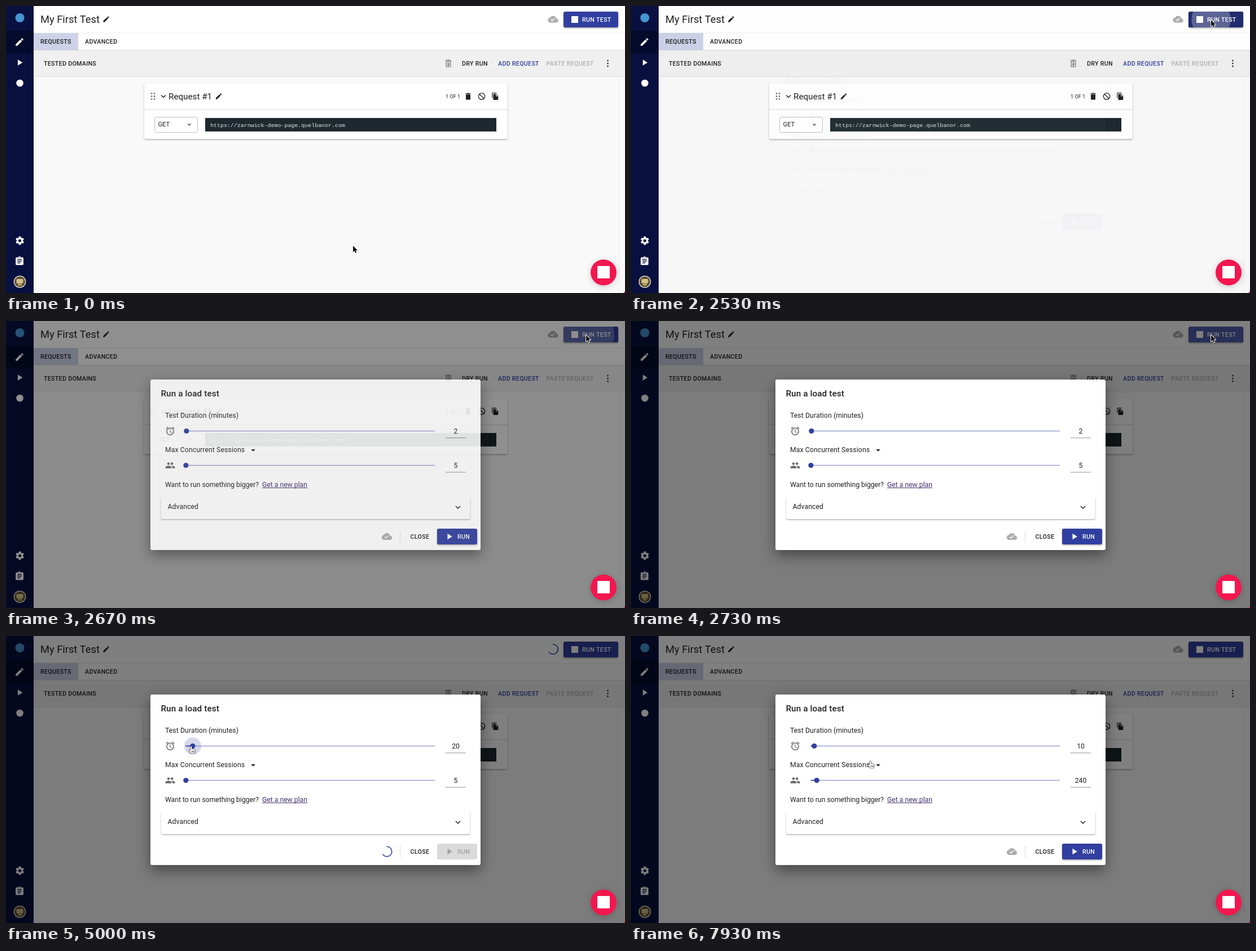
An HTML page with a canvas for the animation above (8 s loop, 1097 by 510 pixels).

```html
<!DOCTYPE html>
<html lang="en">
<head>
<meta charset="utf-8">
<title>Run a load test</title>
<style>
  html, body { margin: 0; width: 100%; height: 100%; overflow: hidden; background: #fafafa; }
  canvas { display: block; width: 100%; height: 100%; }
</style>
</head>
<body>
<canvas id="stage"></canvas>
<script>
const W = 1097, H = 510, LOOP = 8000;
const INK = "#1f1f1f", BLUE = "#303f9f", BLUE_DARK = "#212c6f", SIDE = "#08103f";
const dpr = window.devicePixelRatio || 1;

function makeLayer(canvas) {
  canvas.width = Math.round(W * dpr);
  canvas.height = Math.round(H * dpr);
  const ctx = canvas.getContext("2d");
  ctx.scale(dpr, dpr);
  return ctx;
}
const stage = makeLayer(document.getElementById("stage"));
const sheet = makeLayer(document.createElement("canvas"));
let g = stage; // the context the helpers draw on

const icons = {
  edit: "M3 17.25V21h3.75L17.81 9.94l-3.75-3.75L3 17.25zM20.71 7.04c.39-.39.39-1.02 0-1.41l-2.34-2.34c-.39-.39-1.02-.39-1.41 0l-1.83 1.83 3.75 3.75 1.83-1.83z",
  play: "M8 5v14l11-7z",
  cloud: "M19.35 10.04C18.67 6.59 15.64 4 12 4 9.11 4 6.6 5.64 5.35 8.04 2.34 8.36 0 10.91 0 14c0 3.31 2.69 6 6 6h13c2.76 0 5-2.24 5-5 0-2.64-2.05-4.78-4.65-4.96zM10 17l-3.5-3.5 1.41-1.41L10 14.17 15.18 9l1.41 1.41L10 17z",
  bin: "M6 19c0 1.1.9 2 2 2h8c1.1 0 2-.9 2-2V7H6v12zM19 4h-3.5l-1-1h-5l-1 1H5v2h14V4z",
  restore: "M6 19c0 1.1.9 2 2 2h8c1.1 0 2-.9 2-2V7H6v12zm2-5V9h8v10H8v-5zm2 4h4v-4h2l-4-4-4 4h2zM15.5 4l-1-1h-5l-1 1H5v2h14V4z",
  copy: "M16 1H4c-1.1 0-2 .9-2 2v14h2V3h12V1zm-1 4l6 6v10c0 1.1-.9 2-2 2H7.99C6.89 23 6 22.1 6 21l.01-14c0-1.1.89-2 1.99-2h7zm-1 7h5.5L14 6.5V12z",
  list: "M19 3h-4.18C14.4 1.84 13.3 1 12 1c-1.3 0-2.4.84-2.82 2H5c-1.1 0-2 .9-2 2v14c0 1.1.9 2 2 2h14c1.1 0 2-.9 2-2V5c0-1.1-.9-2-2-2zm-7 0c.55 0 1 .45 1 1s-.45 1-1 1-1-.45-1-1 .45-1 1-1zm2 14H7v-2h7v2zm3-4H7v-2h10v2zm0-4H7V7h10v2z",
  more: "M16.59 8.59L12 13.17 7.41 8.59 6 10l6 6 6-6z",
  drop: "M7 10l5 5 5-5z",
  alarm: "M22 5.72l-4.6-3.86-1.29 1.53 4.6 3.86L22 5.72zM7.88 3.39L6.6 1.86 2 5.71l1.29 1.53 4.59-3.85zM12.5 8H11v6l4.75 2.85.75-1.23-4-2.37V8zM12 4c-4.97 0-9 4.03-9 9s4.02 9 9 9c4.97 0 9-4.03 9-9s-4.03-9-9-9zm0 16c-3.87 0-7-3.13-7-7s3.13-7 7-7 7 3.13 7 7-3.13 7-7 7z",
  people: "M16 11c1.66 0 2.99-1.34 2.99-3S17.66 5 16 5c-1.66 0-3 1.34-3 3s1.34 3 3 3zm-8 0c1.66 0 2.99-1.34 2.99-3S9.66 5 8 5C6.34 5 5 6.34 5 8s1.34 3 3 3zm0 2c-2.33 0-7 1.17-7 3.5V19h14v-2.5c0-2.33-4.67-3.5-7-3.5zm8 0c-.29 0-.62.02-.97.05 1.16.84 1.97 1.97 1.97 3.45V19h6v-2.5c0-2.33-4.67-3.5-7-3.5z",
  arrow: "M0 0V11.5L2.7 9 4.4 13 6.3 12.2 4.6 8.3H8.2z",
  hand: "M-1.2 1.2a1.2 1.2 0 0 1 2.4 0V5q1.2-.9 2 .3 1.2-.6 1.9 .5 1.6-.4 1.9 1V9.3L6 12.8H0L-3.2 8.6q-1.4-2 0-2.3 .9-.2 2 1.5z"
};
for (const name in icons) icons[name] = new Path2D(icons[name]);

// Timing helpers
const clamp = v => Math.max(0, Math.min(1, v));
const smooth = p => (p = clamp(p), p * p * (3 - 2 * p));
const mix = (a, b, p) => a + (b - a) * p;
const between = (t, a, b) => t >= a && t < b;
const ramp = (t, start, length) => smooth((t - start) / length);

function track(keys, t) {
  let i = 0;
  while (i < keys.length - 1 && t >= keys[i + 1][0]) i++;
  const [t0, ...a] = keys[i];
  if (t < t0 || i === keys.length - 1) return a;
  const [t1, ...b] = keys[i + 1];
  const p = smooth((t - t0) / (t1 - t0));
  return a.map((v, k) => mix(v, b[k], p));
}

const cursorKeys = [
  [0, 615, 426], [150, 615, 426], [1740, 1028, 25], [2900, 1028, 25],
  [3950, 319, 196], [4150, 319, 196], [4700, 328, 196], [5150, 328, 196],
  [5600, 323, 196], [5800, 323, 196], [6300, 319, 257], [6450, 319, 257],
  [6670, 322, 257], [7150, 329, 257], [7450, 329, 257], [7920, 424, 222]
];
const minuteKeys = [[4076, 2], [4700, 20], [5150, 20], [5600, 10]];
const sessionKeys = [[6450, 5], [6670, 70], [7150, 240]];

// Drawing helpers
function rect(x, y, w, h, fill, r = 0) {
  g.fillStyle = fill;
  g.beginPath();
  g.roundRect(x, y, w, h, r);
  g.fill();
}
function disc(x, y, r, fill) {
  g.fillStyle = fill;
  g.beginPath();
  g.arc(x, y, r, 0, Math.PI * 2);
  g.fill();
}
function shadowed(blur, dy, alpha, draw) {
  g.save();
  g.shadowColor = `rgba(0,0,0,${alpha})`;
  g.shadowBlur = blur * dpr;
  g.shadowOffsetY = dy * dpr;
  draw();
  g.restore();
}
function icon(name, x, y, size, fill) {
  g.save();
  g.translate(x - size / 2, y - size / 2);
  g.scale(size / 24, size / 24);
  g.fillStyle = fill;
  g.fill(icons[name]);
  g.restore();
}
// y is the middle of the capitals
function text(str, x, y, size, fill = INK, { weight = 400, gap = 0, align = "left", family = "Roboto, sans-serif" } = {}) {
  g.font = `${weight} ${size}px ${family}`;
  g.letterSpacing = gap + "px";
  g.textAlign = align;
  g.fillStyle = fill;
  g.fillText(str, x, y + size * 0.355);
}
const label = (str, x, y, fill) => text(str, x, y, 10.67, fill, { weight: 500, gap: 0.3 });
const body = (str, x, y, gap = 0.11) => text(str, x, y, 12.19, INK, { gap });

function spinner(x, y, age) {
  const p = (age / 1400) % 1;
  const early = smooth(p * 2), late = smooth(p * 2 - 1);
  const from = 15 * early + 110 * late;
  const len = Math.min(mix(1, 100, early), 126 - from);
  const unit = Math.PI * 2 / 126;
  const a = Math.PI * (2 * p - 0.5) + from * unit;
  g.strokeStyle = BLUE;
  g.lineWidth = 1.6;
  g.beginPath();
  g.arc(x, y, 8.8, a, a + len * unit);
  g.stroke();
}
function saveState(x, y, t, fill) {
  if (between(t, 4076, 6660)) spinner(x, y, t - 4076);
  else if (between(t, 6900, 7600)) spinner(x, y, t - 6900);
  else icon("cloud", x, y, 18.3, fill);
}

function drawSidebar() {
  rect(0, 0, 49, H, SIDE);
  rect(0, 44, 49, 40, "#040a2b");
  disc(24.5, 21, 8, "#4596d1");
  icon("edit", 24, 64, 18.3, "#fff");
  icon("play", 24, 100.5, 18.3, "#fff");
  disc(24.5, 137, 6.3, "#fff");

  for (let i = 0; i < 3; i++) {
    g.save();
    g.translate(24.5, 417);
    g.rotate(i * Math.PI / 3);
    rect(-2.1, -7.4, 4.2, 14.8, "#fff", 0.8);
    g.restore();
  }
  disc(24.5, 417, 5.5, "#fff");
  disc(24.5, 417, 2.6, SIDE);

  icon("list", 24, 453.5, 18.3, "#fff");
  disc(24.5, 490, 10.8, "#f1ecdb");
  disc(24.5, 490, 9.6, "#5c4f31");
  rect(18.5, 485, 12, 8, "#d3c08a", 2);
  rect(21, 492, 7, 5, "#b39f68", 1);
}

function drawRunTest(t) {
  const hover = ramp(t, 1700, 240) * (1 - ramp(t, 2560, 170));
  const box = [988, 10, 97, 28];
  shadowed(3, 1.5, 0.35, () => rect(...box, BLUE, 3));
  g.save();
  g.globalAlpha = hover;
  rect(...box, BLUE_DARK, 3);
  g.restore();
  if (between(t, 2470, 2900)) {
    g.save();
    g.beginPath();
    g.roundRect(...box, 3);
    g.clip();
    g.globalAlpha = 0.27 * (1 - ramp(t, 2600, 300));
    disc(1028, 24, 28 + 0.11 * (t - 2470), "#fff");
    g.restore();
  }
  rect(1002, 18, 12, 12, "#fff");
  label("RUN TEST", 1021, 24, "#fff");
}

function drawCard() {
  shadowed(2.5, 1.2, 0.35, () => rect(245, 138, 644, 98.5, "#fff", 3));
  rect(245, 183.5, 644, 1, "#d6d6d6");
  for (const x of [258, 263])
    for (const y of [155.5, 160.5, 165.5]) disc(x, y, 1.4, "#757575");
  icon("more", 279, 160.5, 18.3, INK);
  text("Request #1", 288, 160.5, 15.24);
  icon("edit", 377, 160.5, 13.7, INK);
  text("1 OF 1", 779, 160.5, 9.14);
  icon("bin", 819, 160.5, 16, INK);
  g.strokeStyle = INK;
  g.lineWidth = 1.3;
  g.beginPath();
  g.arc(843, 160.5, 5.7, 0, Math.PI * 2);
  g.moveTo(839, 156.5);
  g.lineTo(847, 164.5);
  g.stroke();
  icon("copy", 867, 160.5, 14, INK);

  g.strokeStyle = "#bdbdbd";
  g.lineWidth = 1;
  g.beginPath();
  g.roundRect(263.5, 197.5, 76, 27, 3);
  g.stroke();
  text("GET", 269.5, 210.5, 11.2);
  icon("drop", 325, 211, 18.3, "#757575");
  rect(353, 199, 516, 24, "#1d292f");
  const scheme = "https:", host = "zarnwick-demo-page.quelbanor.com";
  text(`${scheme}//${host}`, 362, 211, 9.96, "#e4e7e8", { family: "'Liberation Mono', monospace" });
}

function drawPage(t) {
  rect(0, 0, W, H, "#f9f9f9");
  rect(1086, 126, 1, H - 126, "#ededed");
  rect(49, 0, W - 49, 78, "#fff");
  rect(49, 47.5, W - 49, 1, "#ececec");
  rect(49, 48, 79, 30, "#cdd2e9");
  rect(49, 78, W - 49, 1, "#d9d9d9");
  rect(49, 79, W - 49, 46, "#f0f0f0");
  rect(49, 125, W - 49, 1, "#e0e0e0");

  text("My First Test", 61, 23.5, 18.29);
  icon("edit", 177.5, 23.5, 13.7, INK);
  saveState(969.5, 23.5, t, "#adadad");
  drawRunTest(t);

  label("REQUESTS", 61, 63.5, INK);
  label("ADVANCED", 140, 63.5, INK);
  label("TESTED DOMAINS", 67, 102.5, INK);
  icon("restore", 784, 102, 18.3, "#8c8c8c");
  label("DRY RUN", 808, 102.5, INK);
  label("ADD REQUEST", 872, 102.5, BLUE);
  label("PASTE REQUEST", 957.5, 102.5, "#b0b0b0");
  for (const y of [97, 102, 107]) disc(1066.5, y, 1.5, "#444");

  drawCard();
  drawSidebar();
}

function drawSlider(y, value, max, halo) {
  const x0 = 318.6, x = x0 + 441 * value / max;
  rect(x0, y - 0.8, 441.4, 1.6, "rgba(48,63,159,.48)");
  rect(x0, y - 0.8, x - x0, 1.6, BLUE);
  if (halo > 0) disc(x, y, 4.6 + 10.6 * halo, "rgba(48,63,159,.2)");
  disc(x, y, 4.6, BLUE);
  text(String(value), 797, y, 12.19, INK, { align: "center" });
  rect(779, y + 11.8, 36, 1, "#949494");
}

function drawRunButton(t) {
  const busy = between(t, 4076, 6660) || between(t, 6900, 7600);
  const on = busy ? 0 : t < 4076 ? 1 : t < 6900 ? ramp(t, 6660, 250) : ramp(t, 7600, 250);
  rect(764, 369, 71, 28, "#dadada", 3);
  g.save();
  g.globalAlpha = on;
  shadowed(3, 1.5, 0.35, () => rect(764, 369, 71, 28, BLUE, 3));
  g.restore();
  const ink = busy ? "#a3a3a3" : "#fff";
  icon("play", 785.5, 383, 18.3, ink);
  label("RUN", 800, 383.5, ink);
}

function drawDialog(t) {
  g.clearRect(0, 0, W, H);
  shadowed(24, 9, 0.45, () => rect(256, 104, 585, 303, "#fff", 3));
  text("Run a load test", 274.5, 129, 15.24, INK, { weight: 500, gap: 0.11 });

  body("Test Duration (minutes)", 282, 168);
  icon("alarm", 291, 195.5, 18.3, "#666");
  const minutes = Math.round(track(minuteKeys, t)[0]);
  drawSlider(195.5, minutes, 720, ramp(t, 3920, 150) * (1 - ramp(t, 5800, 150)));

  body("Max Concurrent Sessions", 282, 229);
  icon("drop", 438, 229.5, 18.3, INK);
  icon("people", 291, 256.5, 18.3, "#666");
  const raw = track(sessionKeys, t)[0];
  const sessions = raw <= 5 ? 5 : Math.max(10, Math.round(raw / 10) * 10);
  drawSlider(256.5, sessions, 10000, ramp(t, 6230, 150) * (1 - ramp(t, 7450, 150)));

  body("Want to run something bigger?", 282, 290.5, 0);
  text("Get a new plan", 454, 290.5, 12.19, "#46306f");
  rect(454, 296, 80, 1, "#46306f");

  shadowed(2.5, 1.2, 0.35, () => rect(275, 312, 547.5, 40, "#fff", 3));
  rect(275, 307, 547, 20, "#fff");
  body("Advanced", 286.5, 330);
  icon("more", 801, 331, 18.3, INK);

  saveState(675, 383, t, "#adadad");
  rect(698, 373, 1, 21, "#dedede");
  label("CLOSE", 716.5, 383.5, INK);
  drawRunButton(t);
}

function drawChat() {
  shadowed(12, 2, 0.2, () => disc(1059, 473.5, 23, "#f3164f"));
  rect(1048, 462, 22, 22, "#fff");
  disc(1100, 513, 6.5, "#e0294f");
}

function drawCursor(t) {
  const [x, y] = track(cursorKeys, t);
  const onSlider = x > 310 && x < 770 && (Math.abs(y - 195.5) < 12 || Math.abs(y - 256.5) < 12);
  const onSelect = x > 282 && x < 446 && Math.abs(y - 229) < 10;
  const hand = t > 2900 && (onSlider || onSelect);
  const shape = icons[hand ? "hand" : "arrow"];
  g.save();
  g.translate(x, y);
  g.lineJoin = "round";
  g.lineWidth = hand ? 1.1 : 1.8;
  g.strokeStyle = hand ? "#111" : "#fff";
  g.fillStyle = hand ? "#fff" : "#111";
  g.stroke(shape);
  g.fill(shape);
  if (hand) {
    g.lineWidth = 0.8;
    g.beginPath();
    for (const k of [1.5, 3.4, 5.2]) {
      g.moveTo(k, 8);
      g.lineTo(k, 10.8);
    }
    g.stroke();
  }
  g.restore();
}

function render(t) {
  g = stage;
  drawPage(t);
  const open = ramp(t, 2515, 200);
  if (open > 0) {
    rect(0, 0, W, H, `rgba(0,0,0,${0.5 * open})`);
    g = sheet;
    drawDialog(t);
    g = stage;
    g.globalAlpha = open;
    g.drawImage(sheet.canvas, 0, 0, W, H);
    g.globalAlpha = 1;
  }
  drawChat();
  drawCursor(t);
}

function tick() {
  render(performance.now() % LOOP);
  requestAnimationFrame(tick);
}
tick();
</script>
</body>
</html>
```
